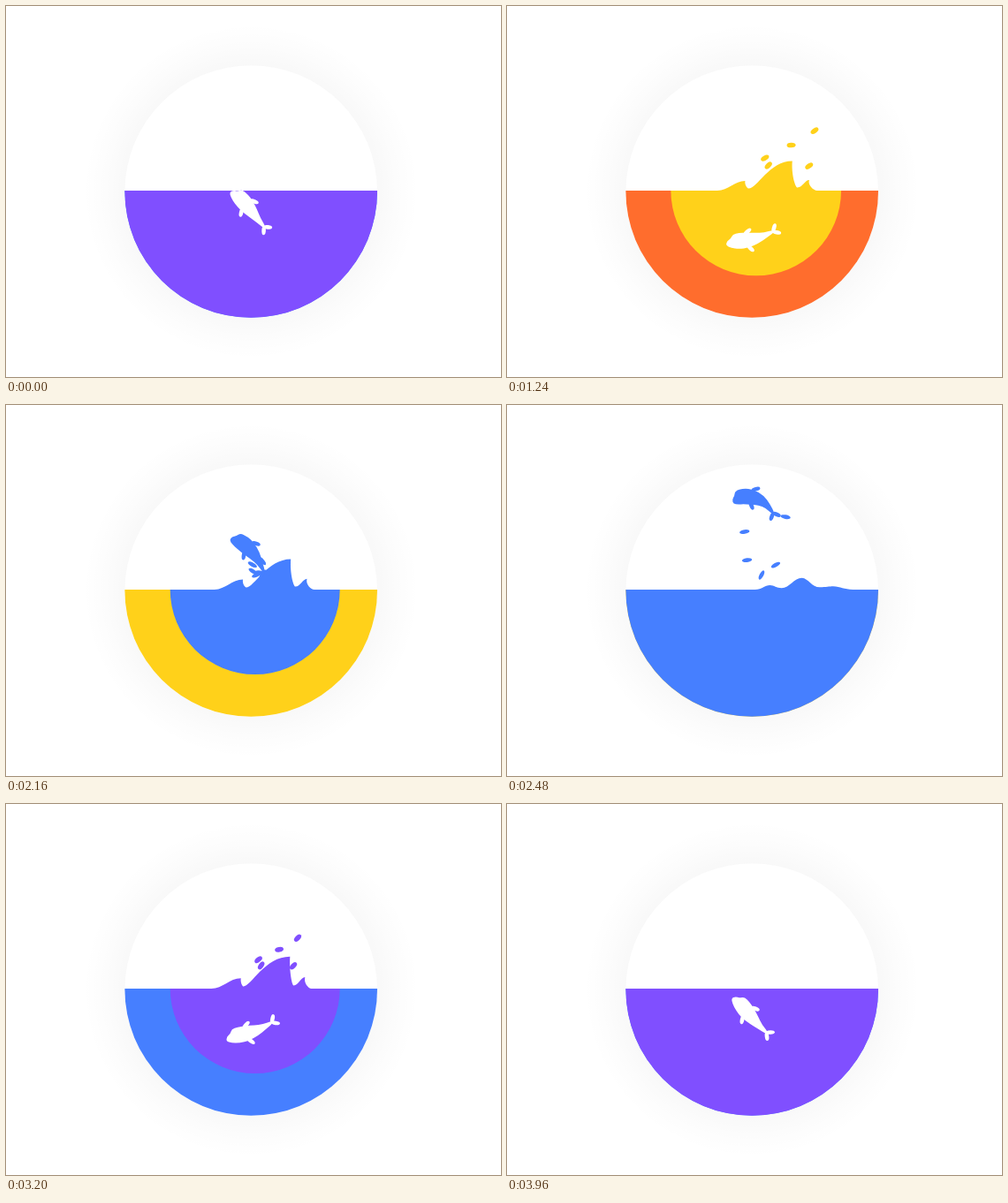
Recreate the animation shown at these times as an HTML page with a canvas. Size 560 by 420 pixels, loop 4 s.

```html
<!DOCTYPE html>
<html lang="en">
<head>
<meta charset="utf-8">
<title>Leaping dolphin</title>
<style>
  html, body { margin: 0; width: 100%; height: 100%; overflow: hidden; background: #fff; }
  canvas { display: block; }
</style>
</head>
<body>
<canvas id="stage" width="560" height="420"></canvas>
<script>
const ctx = document.getElementById('stage').getContext('2d');
const LOOP = 4000, LEAP = 2000, EXIT = 20, ENTRY = 1085, AIR_TIME = 1060;
const SURFACE = 209;
const DISC = { x: 277.2, y: 210, r: 142.8 };
const COLORS = ['#804fff', '#ff6d2d', '#ffd11a', '#467fff'];
const RAD = Math.PI / 180;

// Dolphin in profile: distance along the spine, offset from it
const BODY = [[-27, 5], [-26, 0], [-22, -3], [-20, -8], [-12, -9.5], [-3, -9], [8, -6.5], [18, -3.2],
  [29, -1.4], [29, 1.4], [18, 3.4], [8, 6], [-3, 8.5], [-13, 8.5], [-21, 7.5]];
// Dorsal fin, flipper and two flukes: along, offset, angle
const FINS = [[-1, -10, -28], [-1, 9.5, 52], [31, -3, -42], [31, 3, 42]];

// Foot, crest and trough points of the wave: [x, height] when young and when old
const WAVE = [
  [[235, 0], [286, 0]], [[267.5, 11.5], [301, 4.3]], [[271, 2.5], [315.5, 1.8]],
  [[322, 35], [335, 10.7]], [[327, 3.5], [357, 2.6]], [[340, 12.5], [372.5, 2.6]], [[348, 0], [396.5, 0]]
];

// Drops as x, y, angle at a given time after launch
const ENTRY_SPRAY = {
  age: 135, flight: 170, from: 262, gravity: .0012, spin: .25, rx: 5, ry: 2.8,
  drops: [[338.5, 146.5, -41], [315, 161, -7], [288.5, 174, -35], [292, 181.5, -50], [333, 182, -40]]
};
const EXIT_SPRAY = {
  age: 500, flight: 460, from: 282, gravity: .00078, spin: -.12, rx: 5.7, ry: 2.3,
  drops: [[267.5, 144.5, -14], [270.5, 179.5, -11], [318.2, 126, 6], [306, 185.5, -33], [288.5, 198, -67]]
};

const clamp = v => Math.max(0, Math.min(1, v));
const mix = (a, b, u) => a + (b - a) * u;
const easeOut = (u, power) => 1 - (1 - clamp(u)) ** power;
const smooth = u => (u = clamp(u), u * u * (3 - 2 * u));

function poseAt(phase) {
  const x = 274 + 6.5 * Math.max(0, Math.sin(Math.PI * phase / 1300));
  if (phase < AIR_TIME) {
    const u = phase / AIR_TIME;
    return {
      x, y: 104 + 125 * (2 * u - 1) ** 2,
      rotation: 5 + 45 * Math.cos(Math.PI * u ** 1.1),
      curve: .029 * Math.sin(Math.PI * u)
    };
  }
  const u = (phase - AIR_TIME) / (LEAP - AIR_TIME);
  return {
    x, y: 280 - 51 * Math.abs(2 * u - 1) ** 2.5,
    rotation: mix(-40, 50, easeOut(u, 1.8)),
    curve: -.015 * Math.sqrt(Math.sin(Math.PI * u))
  };
}

function spreadRadius(age) {
  return 96 * easeOut(age / 115, 2) + 64 * smooth((age - 150) / 140);
}

function circle(x, y, r) {
  ctx.beginPath();
  ctx.arc(x, y, r, 0, 7);
  ctx.fill();
}

function ellipse(x, y, rx, ry, angle) {
  ctx.beginPath();
  ctx.ellipse(x, y, rx, ry, angle, 0, 7);
  ctx.fill();
}

function clipped(y, height, draw) {
  ctx.save();
  ctx.beginPath();
  ctx.rect(0, y, 560, height);
  ctx.clip();
  draw();
  ctx.restore();
}

function drawDolphin({ x, y, rotation, curve }, color) {
  const k = curve || 1e-5;
  const bend = ([s, d]) => {
    const a = k * s;
    return [Math.sin(a) / k - d * Math.sin(a), (1 - Math.cos(a)) / k + d * Math.cos(a)];
  };
  const points = BODY.map(bend);
  const middle = (a, b) => [(a[0] + b[0]) / 2, (a[1] + b[1]) / 2];
  ctx.save();
  ctx.translate(x, y);
  ctx.rotate(rotation * RAD);
  ctx.fillStyle = color;
  ctx.beginPath();
  ctx.moveTo(...middle(points[points.length - 1], points[0]));
  points.forEach((p, i) => ctx.quadraticCurveTo(...p, ...middle(p, points[(i + 1) % points.length])));
  ctx.fill();
  for (const [s, d, angle] of FINS) ellipse(...bend([s, d]), 5, 2.3, angle * RAD + k * s);
  ctx.restore();
}

function drawWave(age) {
  const u = (age - 135) / 365;
  const strength = clamp(age / 90) * clamp((740 - age) / 200);
  const sharp = clamp(1 - u);
  const points = WAVE.map(([young, old]) => [
    mix(young[0], old[0], u),
    SURFACE - strength * Math.max(0, mix(young[1], old[1], u))
  ]);
  ctx.beginPath();
  ctx.moveTo(...points[0]);
  for (let i = 1; i < points.length; i++) {
    const [ax, ay] = points[i - 1], [bx, by] = points[i], dx = bx - ax;
    if (by < ay) {
      // Taller crests rise in a fuller curve
      const bulge = clamp((ay - by) / 35);
      ctx.bezierCurveTo(ax + dx * (.5 - .35 * bulge), ay, bx - dx * (.3 + .25 * bulge), by, bx, by);
    } else {
      // Young crests break abruptly on the far side
      ctx.bezierCurveTo(ax + dx * (.45 - .7 * sharp), mix(ay, by, .5 * sharp), bx - dx * .45, by, bx, by);
    }
  }
  ctx.fill();
}

// Every drop flies on a parabola from one launch point at the surface
function drawSpray({ age: shownAge, flight, from, gravity, spin, rx, ry, drops }, age) {
  const t = age - shownAge, size = clamp(age / 60);
  for (const [x, y, angle] of drops) {
    const vx = (x - from) / flight;
    const vy = (y - SURFACE) / flight + gravity * flight / 2;
    ellipse(x + vx * t, y + vy * t + gravity * t * t / 2, rx * size, ry * size, (angle + spin * t) * RAD);
  }
}

function drawShadow() {
  const g = ctx.createRadialGradient(DISC.x, DISC.y, DISC.r - 2, DISC.x, DISC.y, 190);
  g.addColorStop(0, 'rgba(0,0,0,.027)');
  g.addColorStop(.5, 'rgba(0,0,0,.011)');
  g.addColorStop(1, 'rgba(0,0,0,0)');
  ctx.fillStyle = g;
  ctx.fillRect(0, 0, 560, 420);
}

function render(time) {
  const t = time % LOOP, phase = t % LEAP;
  let step = Math.floor(t / LEAP) * 2, start = ENTRY - LEAP;
  if (phase >= ENTRY) { step += 2; start = ENTRY; }
  else if (phase >= EXIT) { step += 1; start = EXIT; }
  const age = phase - start;
  const oldColor = COLORS[(step + 3) % 4], color = COLORS[step % 4];
  const pose = poseAt(phase);

  ctx.fillStyle = '#fff';
  ctx.fillRect(0, 0, 560, 420);
  drawShadow();
  ctx.save();
  ctx.fillStyle = '#fff';
  circle(DISC.x, DISC.y, DISC.r);
  ctx.clip();
  clipped(SURFACE, 211, () => {
    ctx.fillStyle = oldColor;
    ctx.fillRect(0, SURFACE, 560, 211);
    ctx.fillStyle = color;
    circle(281.7, SURFACE, spreadRadius(age));
    drawDolphin(pose, '#fff');
  });
  clipped(0, SURFACE, () => {
    ctx.fillStyle = color;
    drawWave(age);
    drawSpray(step % 2 ? EXIT_SPRAY : ENTRY_SPRAY, age);
    drawDolphin(pose, color);
  });
  ctx.restore();
}

function frame() {
  render(performance.now());
  requestAnimationFrame(frame);
}
frame();
</script>
</body>
</html>
```
